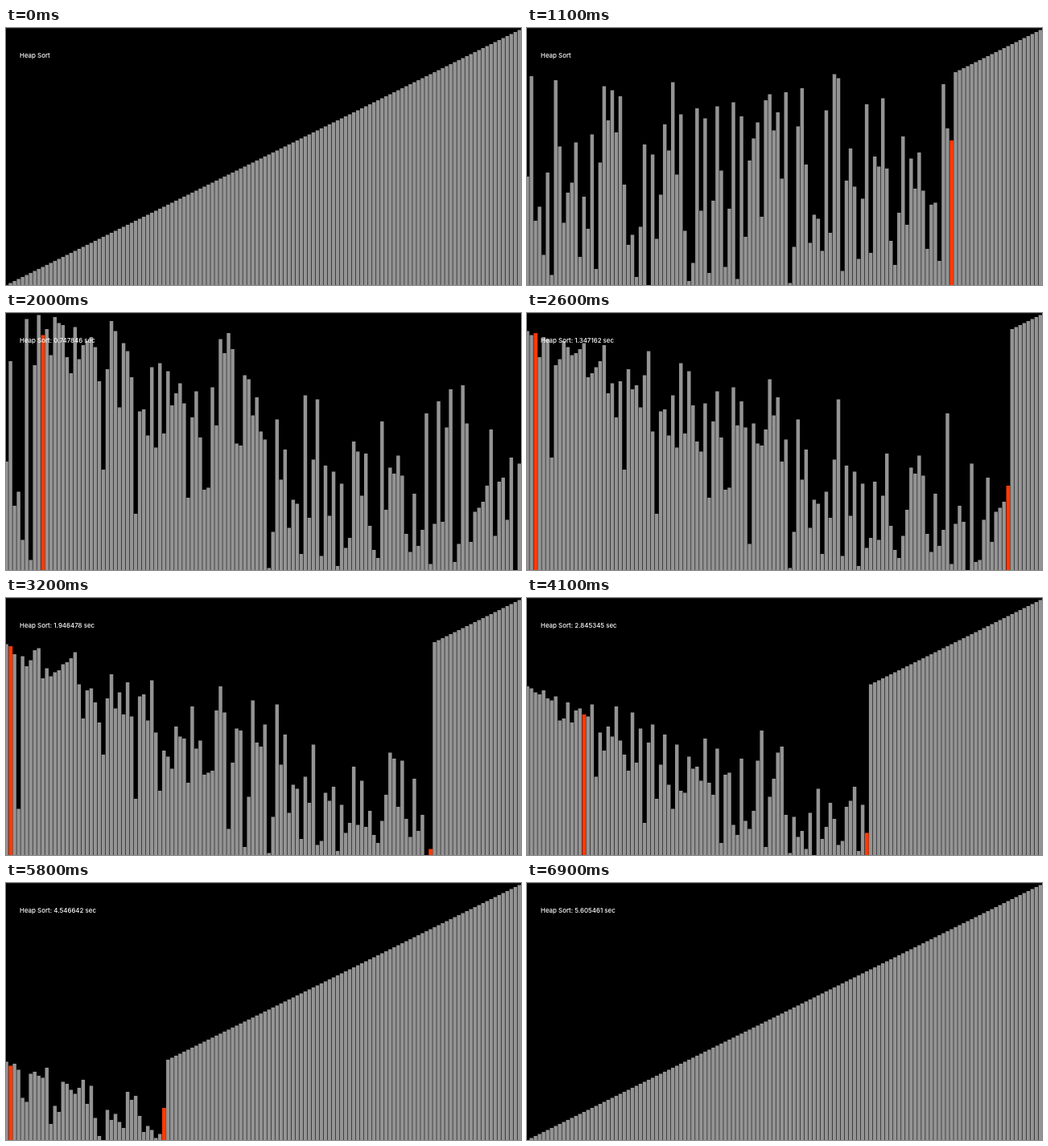
Recreate the animation shown at these times as an HTML page with a canvas. Size 640 px wide and 320 px high, loop 7.1 s.

```html
<!DOCTYPE html>
<html lang="en">
<head>
<meta charset="utf-8">
<title>Heap Sort</title>
<style>
  html, body { margin: 0; width: 100%; height: 100%; overflow: hidden; background: #000; }
  canvas { position: absolute; left: 0; top: 0; }
  #label {
    position: absolute; left: 17px; top: 29px;
    font: 500 7.9px/10px Inter, Roboto, sans-serif;
    color: #fff; white-space: pre;
  }
</style>
</head>
<body>
<canvas id="stage" width="640" height="320"></canvas>
<div id="label">Heap Sort</div>
<script>
const LOOP = 7100, FRAME = 100;
const SHUFFLE_START = 350, SHUFFLE_RATE = 0.14, SORT_START = 1253.4;
const PITCH = 5.019, LEFT = -2, UNIT = 2.5;

// Order of the bars once shuffled
const shuffled = [
  54, 104, 32, 39, 15, 125, 5, 102, 127, 117,
  116, 51, 71, 14, 122, 28, 75, 8, 61, 99,
  82, 120, 76, 94, 50, 20, 124, 4, 29, 70,
  109, 65, 106, 45, 80, 67, 101, 55, 85, 27,
  2, 11, 88, 37, 83, 6, 111, 89, 57, 9,
  38, 91, 3, 84, 108, 118, 73, 81, 34, 113,
  95, 77, 86, 53, 96, 1, 19, 79, 98, 60,
  21, 35, 33, 121, 87, 26, 105, 103, 7, 52,
  68, 49, 112, 43, 114, 16, 64, 59, 93, 58,
  22, 10, 36, 74, 30, 107, 48, 66, 47, 18,
  40, 41, 12, 100, 78, 72, 23, 115, 24, 126,
  90, 119, 13, 92, 110, 63, 123, 31, 62, 42,
  97, 17, 44, 46, 25, 56, 0, 69
];
const N = shuffled.length;
const sorted = shuffled.map((_, i) => i);

const swap = (a, i, j) => { [a[i], a[j]] = [a[j], a[i]]; };

function shuffleSteps() {
  // Unwind the shuffle to learn each swap partner, then replay it
  const back = [...shuffled], partner = [];
  for (let i = N - 1; i >= 0; i--) {
    partner[i] = back.indexOf(i);
    swap(back, i, partner[i]);
  }
  const a = [...sorted];
  return partner.map((j, i) => {
    swap(a, i, j);
    return { bars: [...a], root: i, end: -1 };
  });
}

function sortSteps() {
  const a = [...shuffled], steps = [];
  const show = (root, end) => steps.push({ bars: [...a], root, end });

  function sift(root, last, end) {
    while (2 * root + 1 <= last) {
      let child = 2 * root + 1;
      if (child < last && a[child + 1] > a[child]) child++;
      const sink = a[child] > a[root];
      if (sink) swap(a, root, child);
      show(root, end);
      if (!sink) break;
      root = child;
    }
  }

  for (let start = N / 2 - 1; start >= 0; start--) {
    show(start, -1);
    sift(start, N - 1, -1);
  }
  for (let end = N - 2; end >= 0; end--) {
    swap(a, 0, end + 1);
    show(0, end);
    sift(0, end, end);
  }
  show(-1, -1);
  return steps;
}

const shuffle = shuffleSteps();
const sort = sortSteps();
const stepAt = (root, end) => sort.findIndex(s => s.root === root && s.end === end);

// Pace of the sort: time in the loop, microseconds on the clock, step
const pace = [
  [SORT_START, 0, 0],
  [2000, 747846, stepAt(9, -1)],
  [3200, 1946478, stepAt(1, 105)],
  [4100, 2845345, stepAt(14, 84)],
  [5800, 4546642, stepAt(1, 39)],
  [6858.6, 5605461, sort.length - 1]
];

function progress(t) {
  const k = Math.max(1, pace.findIndex(p => p[0] >= t));
  const [from, to] = t >= pace.at(-1)[0] ? [pace.at(-1), pace.at(-1)] : [pace[k - 1], pace[k]];
  const f = from === to ? 0 : (t - from[0]) / (to[0] - from[0]);
  return [1, 2].map(c => Math.round(from[c] + (to[c] - from[c]) * f));
}

const ctx = document.getElementById("stage").getContext("2d");
const label = document.getElementById("label");

function draw({ bars, root, end }) {
  ctx.fillStyle = "#000";
  ctx.fillRect(0, 0, 640, 320);
  ctx.fillStyle = "#161616";
  ctx.fillRect(0, 0, 640, 1);
  bars.forEach((v, i) => {
    const lit = i === root || i === end;
    ctx.fillStyle = lit ? "#ff3a05" : "#949494";
    ctx.fillRect(LEFT + i * PITCH + 0.3, 320 - v * UNIT, PITCH - (lit ? 0.2 : 0.55), v * UNIT);
  });
}

function render(t) {
  let text = "Heap Sort", state;
  if (t < 400) {
    state = { bars: sorted, root: -1, end: -1 };
  } else if (t < SORT_START) {
    const i = Math.round((t - SHUFFLE_START) * SHUFFLE_RATE);
    state = shuffle[Math.min(N - 1, i)];
  } else {
    const [micros, step] = progress(t);
    state = sort[step];
    text += `: ${(micros / 1e6).toFixed(6)} sec`;
  }
  draw(state);
  label.textContent = text;
}

const origin = performance.now();
let shown = -1;
function tick() {
  const t = Math.floor(((performance.now() - origin) % LOOP) / FRAME) * FRAME;
  if (t !== shown) render(shown = t);
  requestAnimationFrame(tick);
}
tick();
</script>
</body>
</html>
```
